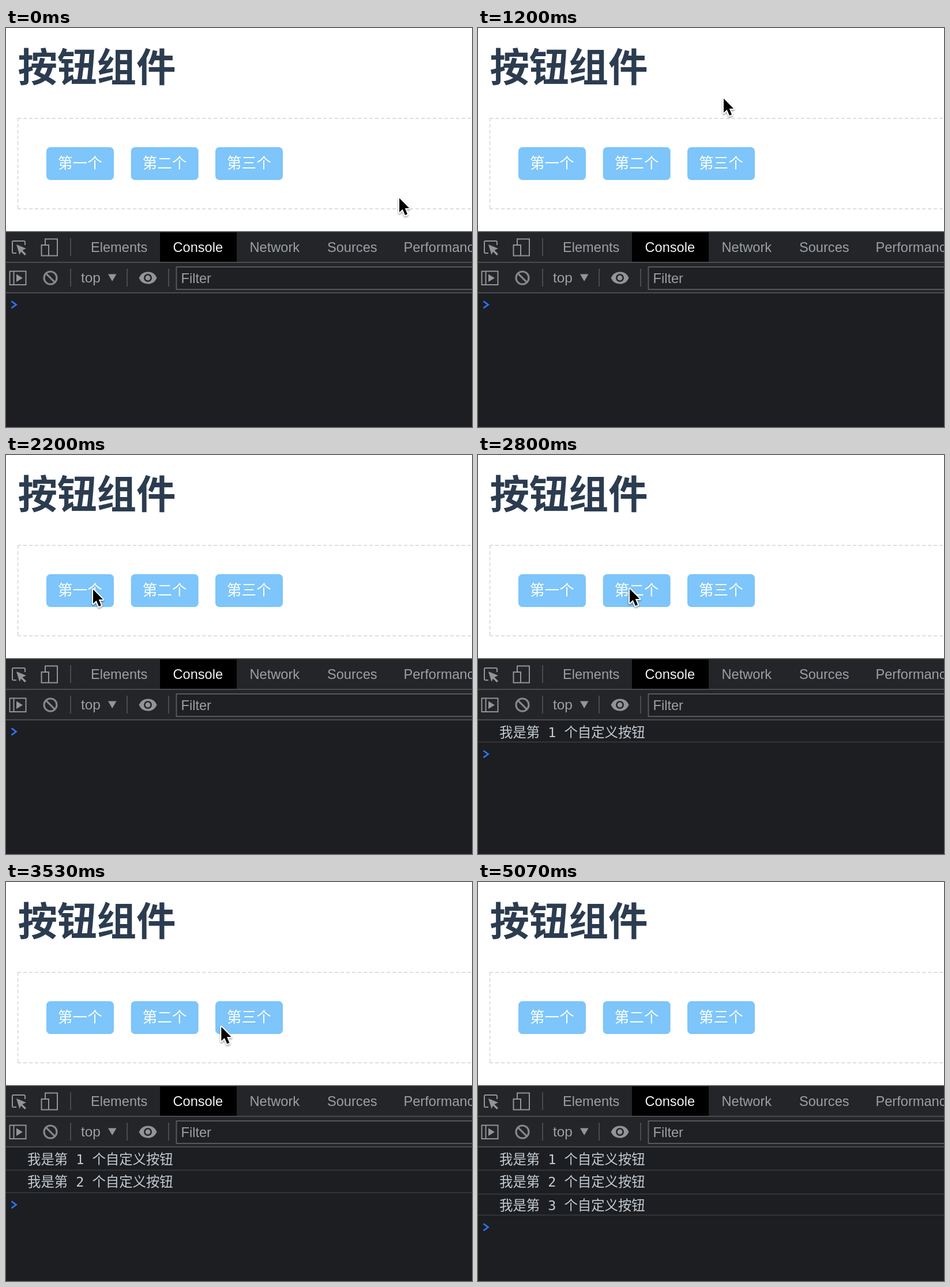
An HTML page for the animation above (5110 ms loop, 808 by 693 pixels).

```html
<!DOCTYPE html>
<html lang="zh-CN">
<head>
<meta charset="utf-8">
<title>按钮组件</title>
<style>
  html, body { margin: 0; width: 100%; height: 100%; overflow: hidden; background: #fff; }
  svg { display: block; width: 100vw; height: 100vh; }

  .title { font: 700 68.5px "Noto Sans CJK SC", sans-serif; fill: #2c3c50; }
  .button rect { fill: #7dc5fa; }
  .button text { font: 300 25.6px "Noto Sans CJK SC", sans-serif; fill: #fff; }
  .dashed { fill: none; stroke: #dedede; stroke-width: 2; stroke-dasharray: 6 4; }

  .ui { font: 23.6px "Liberation Sans", Arial, sans-serif; fill: #9ba0a5; }
  .ui .active { fill: #f1f3f4; }
  .menu { font-size: 24.4px; }
  .rule { stroke: #4a4b4e; stroke-width: 2; }
  .line { fill: none; stroke: #929496; stroke-width: 2; }
  .solid { fill: #929496; }
  .log { font: 500 23.4px "DejaVu Sans Mono", "Noto Sans CJK SC", monospace; fill: #c3ccd4; }
  .sep { stroke: #3b3c40; stroke-width: 1.6; }
  .prompt { fill: none; stroke: #2f74f2; stroke-width: 2.8; }

  .row, .tail, .cursor { animation: 5110ms step-end infinite; }
  .row { visibility: hidden; }
  .row1 { animation-name: row1; }
  .row2 { animation-name: row2; }
  .row3 { animation-name: row3; }
  .tail { animation-name: tail; }
  .cursor { animation-name: move; animation-timing-function: linear; }

  @keyframes row1 { 0% { visibility: hidden } 45.6%, 100% { visibility: visible } }
  @keyframes row2 { 0% { visibility: hidden } 58.7%, 100% { visibility: visible } }
  @keyframes row3 { 0% { visibility: hidden } 77.5%, 100% { visibility: visible } }

  /* The prompt and the newest separator drop one row per message. */
  @keyframes tail {
    0% { transform: translateY(0) }
    45.6% { transform: translateY(39px) }
    58.7% { transform: translateY(80px) }
    77.5%, 100% { transform: translateY(119px) }
  }

  @keyframes move {
    0%, 10.96% { transform: translate(681px, 294px) }
    13.3% { transform: translate(655px, 270px) }
    16.8% { transform: translate(555px, 182px) }
    20.7% { transform: translate(440px, 125px) }
    22.9%, 24.8% { transform: translate(425px, 121px) }
    28.4% { transform: translate(325px, 170px) }
    31.9% { transform: translate(218px, 214px) }
    34.64% { transform: translate(185px, 221px) }
    39.1%, 48.9% { transform: translate(150px, 232px) }
    53.6% { transform: translate(245px, 230px) }
    54.8% { transform: translate(262px, 231px) }
    56.8%, 64.6% { transform: translate(267px, 231px) }
    69.08% { transform: translate(372px, 250px) }
    71.2% { transform: translate(400px, 252px) }
    88.64% { transform: translate(400px, 252px); animation-timing-function: step-end }
    88.65% { transform: translate(530px, 205px); animation-timing-function: step-end }
    89.33% { transform: translate(690px, 139px); opacity: 1; animation-timing-function: step-end }
    90.02%, 100% { transform: translate(690px, 139px); opacity: 0 }
  }
</style>
</head>
<body>
<svg viewBox="0 0 808 693">
  <defs>
    <filter id="shadow" x="-50%" y="-30%" width="200%" height="180%">
      <feDropShadow dx="0" dy="2" stdDeviation="1.6" flood-opacity=".4"/>
    </filter>
  </defs>

  <text class="title" x="20.5" y="93">按钮组件</text>
  <path class="dashed" d="M20 157H820"/>
  <path class="dashed" d="M20 314H820"/>
  <path class="dashed" d="M20.5 157V314"/>
  <g class="button" transform="translate(70 207)">
    <rect width="117" height="57" rx="7"/><text x="20" y="36.7">第一个</text>
  </g>
  <g class="button" transform="translate(216.7 207)">
    <rect width="117" height="57" rx="7"/><text x="20" y="36.7">第二个</text>
  </g>
  <g class="button" transform="translate(363 207)">
    <rect width="117" height="57" rx="7"/><text x="20" y="36.7">第三个</text>
  </g>

  <!-- Panel and tab bar -->
  <rect y="353.5" width="808" height="340" fill="#1d1e21"/>
  <rect y="353.5" width="808" height="106.5" fill="#242528"/>
  <path d="M0 354.25H808" stroke="#3d4341" stroke-width="1.5"/>
  <rect x="267" y="355" width="133" height="51" fill="#000"/>
  <path class="rule" d="M0 407H808M112 365V396M112 418V449M210 418V449M282 418V449"/>
  <g class="ui">
    <text x="147" y="388.5">Elements</text>
    <text class="active" x="289.5" y="388.5">Console</text>
    <text x="422.5" y="388.5">Network</text>
    <text x="557" y="388.5">Sources</text>
    <text x="689.5" y="388.5">Performance</text>
  </g>

  <!-- Inspect and device icons -->
  <path class="line" d="M18 391H13Q11 391 11 389V372Q11 370 13 370H31Q33 370 33 372V377"/>
  <path class="solid" d="M18 376L35 383L28.5 386L35 392.5L32.5 395L26 388.5L23.5 394Z"/>
  <path class="line" d="M68 376V366.5H89V395.5H75M61.5 377H74V395.5H61.5Z"/>

  <!-- Filter bar -->
  <path class="line" d="M6.5 422.5H34.5V446H6.5ZM13.5 422V446"/>
  <path class="solid" d="M18 427.5L29 434.2L18 441Z"/>
  <g fill="none" stroke="#858789" stroke-width="3.2">
    <circle cx="77" cy="434" r="11"/>
    <path d="M69.3 426.3L84.7 441.7"/>
  </g>
  <text class="ui menu" x="130" y="441.5">top</text>
  <path class="solid" d="M177 427.5H191.5L184.2 440Z"/>
  <path class="solid" d="M230.5 434Q235 423.5 246 423.5T261.5 434Q257 444.5 246 444.5T230.5 434Z"/>
  <circle cx="246" cy="434" r="5.7" fill="#929496" stroke="#242528" stroke-width="2.6"/>
  <rect x="295.5" y="415" width="530" height="39" fill="#1f2023" stroke="#57585b" stroke-width="2"/>
  <text class="ui" x="303.5" y="443">Filter</text>

  <!-- Console output -->
  <g class="row row1"><text class="log" x="37" y="489.5">我是第 1 个自定义按钮</text></g>
  <g class="row row2">
    <path class="sep" d="M0 500.5H808"/>
    <text class="log" x="37" y="528.5">我是第 2 个自定义按钮</text>
  </g>
  <g class="row row3">
    <path class="sep" d="M0 542H808"/>
    <text class="log" x="37" y="569.5">我是第 3 个自定义按钮</text>
  </g>
  <g class="tail">
    <path class="sep" d="M0 459.5H808"/>
    <path class="prompt" d="M9.5 474.5L17.5 480.5L9.5 486.5"/>
  </g>
  <path class="rule" d="M0 460H808"/>

  <g class="cursor">
    <path d="M1 1.5v24.5l5.6-5.3 4.4 10.3 4-1.7-4.3-10.2h7.5z" filter="url(#shadow)"
      fill="#000" stroke="#fff" stroke-width="4" stroke-linejoin="round" paint-order="stroke"/>
  </g>
</svg>
</body>
</html>
```
